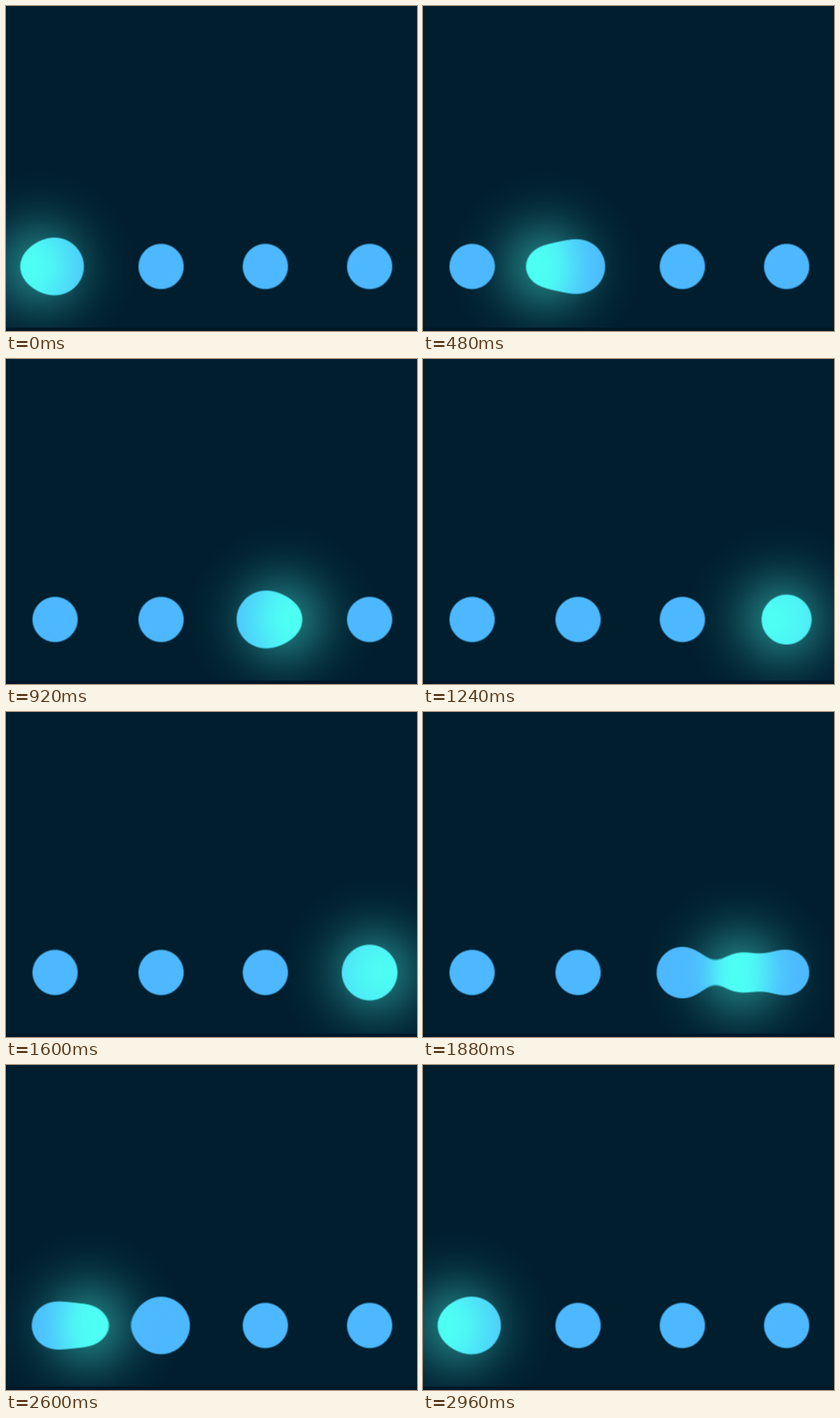
An HTML page for the animation above (3000 ms loop, 473x374 px).

```html
<!DOCTYPE html>
<html lang="en">
<head>
<meta charset="utf-8">
<title>Gooey dots</title>
<style>
  html, body { margin: 0; width: 100%; height: 100%; overflow: hidden; background: #001e2e; }
  svg { display: block; }
</style>
</head>
<body>
<svg id="stage" width="473" height="374" viewBox="0 0 473 374">
  <defs>
    <filter id="goo" filterUnits="userSpaceOnUse" x="-60" y="180" width="600" height="240" color-interpolation-filters="sRGB">
      <feGaussianBlur stdDeviation="15"/>
      <feColorMatrix values="1 0 0 0 0  0 1 0 0 0  0 0 1 0 0  0 0 0 20 -9.5"/>
    </filter>
    <radialGradient id="glow"></radialGradient>
    <radialGradient id="tint" gradientUnits="userSpaceOnUse" cy="300" r="55">
      <stop offset=".2" stop-color="#4dfff3"/>
      <stop offset="1" stop-color="#4db8ff"/>
    </radialGradient>
  </defs>
  <circle id="halo" cy="300" r="110" fill="url(#glow)"/>
  <g id="blobs" filter="url(#goo)"></g>
  <rect y="370" width="473" height="4" fill="#001829"/>
</svg>
<script>
const LOOP = 3000, HALF = LOOP / 2, Y = 299.8;
const LEFT = 39, RIGHT = 436, DOT_R = 30, GROWTH = 0.21;

// Each dot swells around its peaks: [time, extra width] in ms
const dots = [
  { x: 56.5, peaks: [[0, 150]] },
  { x: 178.5, peaks: [[625, 0], [2520, 20]] },
  { x: 298.5, peaks: [[940, 0], [2060, 0]] },
  { x: 418.5, peaks: [[1460, 20]] }
];

const $ = id => document.getElementById(id);
function add(parent, tag, attrs) {
  const el = document.createElementNS('http://www.w3.org/2000/svg', tag);
  for (const key in attrs) el.setAttribute(key, attrs[key]);
  return parent.appendChild(el);
}

// Bell-shaped fade for the light around the moving ball
for (let i = 0; i <= 10; i++) {
  const d = i * 11;
  const alpha = i < 10 ? 0.4 * Math.exp(-d * d / (2 * 38 * 38)) : 0;
  add($('glow'), 'stop', { offset: i / 10, 'stop-color': '#4dfff3', 'stop-opacity': alpha });
}

for (const dot of dots) {
  dot.el = add($('blobs'), 'circle', { cx: dot.x, cy: Y, r: DOT_R, fill: 'url(#tint)' });
}
const ball = add($('blobs'), 'circle', { cy: Y, r: 27, fill: '#4dfff3' });

const bezier = (s, a, b) => 3 * (1 - s) * (1 - s) * s * a + 3 * (1 - s) * s * s * b + s * s * s;

function ease(u) {
  let lo = 0, hi = 1;
  for (let i = 0; i < 24; i++) {
    const mid = (lo + hi) / 2;
    if (bezier(mid, 0.45, 0.6) < u) lo = mid; else hi = mid;
  }
  return bezier(lo, 0.15, 1);
}

function swell(t, [peak, extra]) {
  const gap = Math.abs(t - peak);
  const d = Math.min(gap, LOOP - gap) - extra;
  const v = Math.min(1, Math.max(0, (d - 60) / 240));
  return 1 - v * v * (3 - 2 * v);
}

function draw(now) {
  const t = now % LOOP;
  const p = ease((t % HALF) / HALF);
  const x = LEFT + (RIGHT - LEFT) * (t < HALF ? p : 1 - p);
  for (const id of ['halo', 'tint']) $(id).setAttribute('cx', x);
  ball.setAttribute('cx', x);
  for (const dot of dots) {
    const s = Math.max(...dot.peaks.map(peak => swell(t, peak)));
    dot.el.setAttribute('r', DOT_R * (1 + GROWTH * s));
  }
}

let start;
function tick(now) {
  start ??= now;
  draw(now - start);
  requestAnimationFrame(tick);
}
draw(0);
requestAnimationFrame(tick);
</script>
</body>
</html>
```
